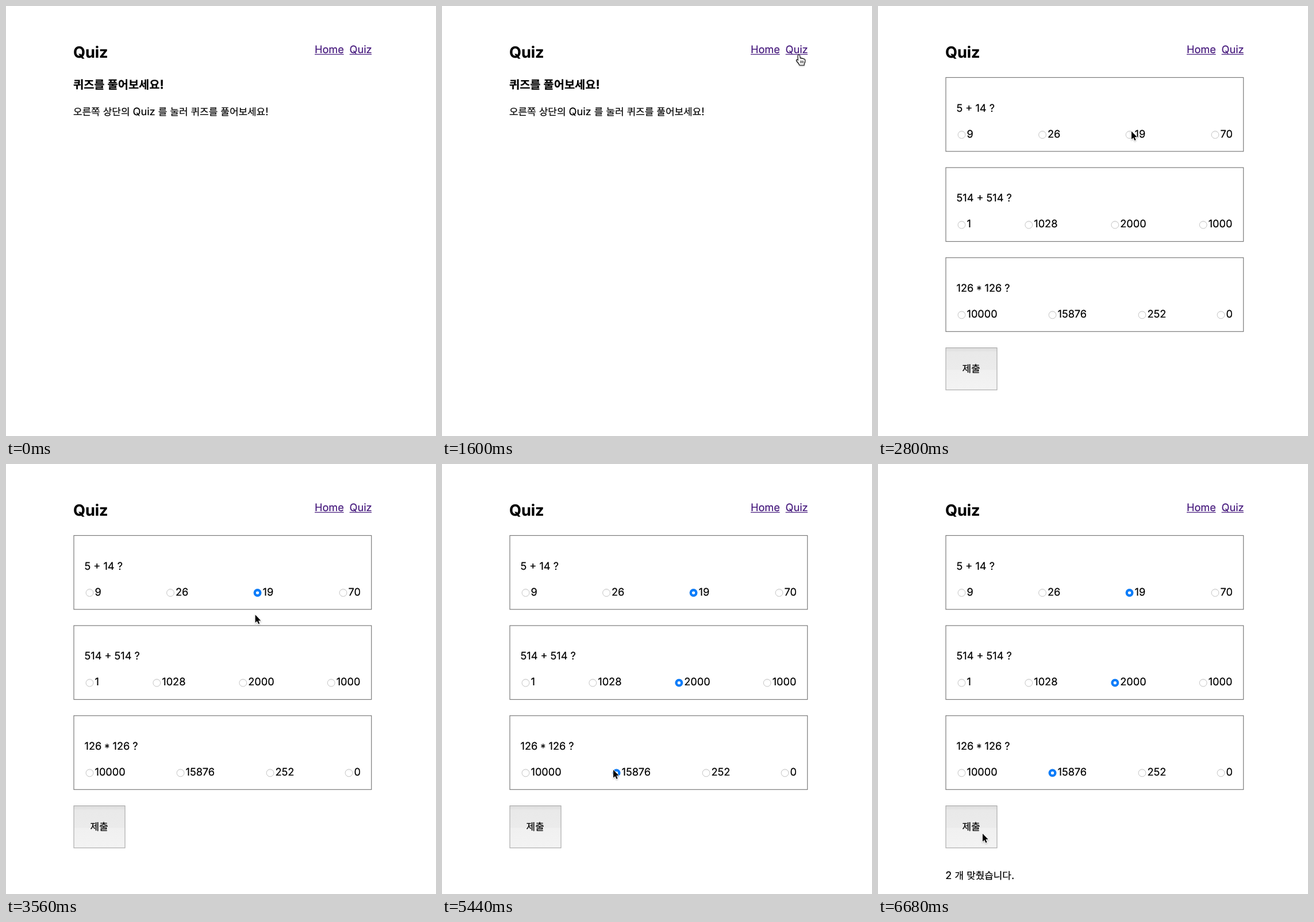
An HTML page for the animation above (6920 ms loop, 748 by 748 pixels).

```html
<!DOCTYPE html>
<html lang="ko">
<head>
<meta charset="utf-8">
<title>Quiz</title>
<style>
  html, body { margin: 0; width: 100%; height: 100%; overflow: hidden; background: #fff; }
  svg { display: block; width: 748px; height: 748px; }
  text { font: 18.15px Inter, "Noto Sans CJK KR", "Noto Sans CJK", sans-serif; fill: #000;
    stroke: #000; stroke-width: .2; white-space: pre; text-rendering: geometricPrecision; }
  .ko { font-family: "Noto Sans CJK KR", "Noto Sans CJK", sans-serif; font-size: .932em; }
  .h2 { font-size: 27px; font-weight: 700; }
  .h3 { font-size: 21.2px; font-weight: 700; }
  .link { fill: #45187c; stroke: #45187c; }
  .rule { stroke: #45187c; stroke-width: 1.3; }
  .card { fill: none; stroke: #767676; stroke-width: 1.15; }
  .star { font-feature-settings: "calt" 0; }
  .off { fill: url(#dial); stroke: #bdbdbd; stroke-width: .9; }
  .on { fill: #0d7dfa; }
  .dot { fill: #fff; }
</style>
</head>
<body>
<svg viewBox="0 0 748 748">
  <defs>
    <linearGradient id="dial" x2="0" y2="1">
      <stop offset="0" stop-color="#f3f3f3"/><stop offset=".35" stop-color="#fff"/>
    </linearGradient>
    <linearGradient id="face" x2="0" y2="1">
      <stop offset="0" stop-color="#dfdfdf"/><stop offset=".09" stop-color="#e4e4e4"/>
      <stop offset=".09" stop-color="#e9e9e9"/><stop offset=".52" stop-color="#ebebeb"/>
      <stop offset=".53" stop-color="#f0f0f0"/><stop offset="1" stop-color="#f3f3f3"/>
    </linearGradient>
    <filter id="shade" x="-50%" y="-50%" width="200%" height="200%">
      <feDropShadow dx="0" dy="1.2" stdDeviation="1.1" flood-opacity=".3"/>
    </filter>
  </defs>
  <g id="head"></g>
  <g id="home"></g>
  <g id="quiz"></g>
  <g id="result"></g>
  <g id="cursor" filter="url(#shade)">
    <path id="arrow" d="M0 0V13.8L3.2 10.9L5.5 16L7.6 15.1L5.4 10.1H9.7Z"
      stroke="#fff" stroke-width="1.6" paint-order="stroke"/>
    <g id="hand" fill="#fff" stroke="#000" stroke-width="1.1" stroke-linejoin="round">
      <path d="M-1.8 9.5L-2 1.2Q-1.6-.4-.2-.3Q1.2-.2 1.5 1.5L2.2 6Q3.6 4.6 5 6.4Q6.8 5.5 8 7.2Q10 6.8 10.6 8.6Q11 13 9.2 15L9 18H1Q-.5 14.5-4 11Q-5.2 9-4 8.3Q-2.8 8-1.8 9.5Z"/>
      <path d="M2.8 10V14.5M5 10V14.5M7.2 10V14.5" stroke-width=".9"/>
    </g>
  </g>
</svg>
<script>
const LOOP = 6920, STEP = 40;
const $ = id => document.getElementById(id);

// Hangul runs get their own size; the asterisk is lowered to the digits' middle
const mark = s => s
  .replace(/[\uac00-\ud7a3]+/g, '<tspan class="ko">$&</tspan>')
  .replace('* ', '<tspan class="star" dy="2.9">*</tspan><tspan dy="-2.9"> </tspan>');
const text = (x, y, s, cls = '') => `<text x="${x}" y="${y}" class="${cls}">${mark(s)}</text>`;
const link = (x, end, s) => text(x, 81.8, s, 'link') +
  `<path class="rule" d="M${x} 84.1H${end}"/>`;

const radio = (x, y, id) =>
  `<circle class="off" cx="${x}" cy="${y}" r="6.4"/>` +
  (id ? `<g id="${id}"><circle class="on" cx="${x}" cy="${y}" r="6.9"/>` +
        `<circle class="dot" cx="${x}" cy="${y}" r="2.6"/></g>` : '');

// question, [radio x, label], chosen option
const cards = [
  ['5 + 14 ?', [[145.5, '9'], [286, '26'], [437.5, '19'], [586.5, '70']], 2],
  ['514 + 514 ?', [[145.5, '1'], [262.3, '1028'], [412.3, '2000'], [565.7, '1000']], 2],
  ['126 * 126 ?', [[145.5, '10000'], [303.5, '15876'], [459.5, '252'], [596.5, '0']], 1]
];

const card = ([question, options, pick], i) => {
  const y = 124.4 + i * 156.7;
  return `<rect class="card" x="118" y="${y}" width="517.7" height="128.5"/>` +
    text(136.5, y + 59.2, question) +
    options.map(([x, label], k) =>
      radio(x, y + 99.6, k === pick && 'pick' + i) + text(x + 9, y + 104.3, label)).join('');
};

$('head').innerHTML = text(117, 89.7, 'Quiz', 'h2') + link(537, 587.6, 'Home') + link(597.6, 636, 'Quiz');
$('home').innerHTML = text(117, 144, '퀴즈를 풀어보세요!', 'h3') +
  text(117, 189.5, '오른쪽 상단의 Quiz 를 눌러 퀴즈를 풀어보세요!');
$('quiz').innerHTML = cards.map(card).join('') +
  '<rect x="118" y="594.6" width="89" height="73.2" fill="url(#face)" stroke="#a6a6a6" stroke-width="1.1"/>' +
  text(146.6, 637, '제출');
$('result').innerHTML = text(117.3, 722, '2 개 맞췄습니다.');

// pointer path: time, x, y
const path = [
  [440, 520, 690], [720, 590, 370], [1000, 624, 131], [1160, 621, 85], [2200, 621, 85],
  [2560, 546, 130], [2760, 441, 218], [3320, 441, 218], [4000, 415, 373], [4400, 415, 373],
  [4760, 334, 517], [5000, 298, 532], [5440, 298, 532], [5880, 200, 620],
  [6080, 182, 643], [LOOP, 182, 643]
];

const slope = (i, k) => {
  const a = path[i - 1], p = path[i], b = path[i + 1];
  if (!a) return (b[k] - p[k]) / (b[0] - p[0]);
  if (!b || a[k] === p[k] || b[k] === p[k]) return 0;
  return (b[k] - a[k]) / (b[0] - a[0]);
};

const along = (t, k) => {
  const i = Math.max(0, path.findLastIndex(p => p[0] <= t));
  const p = path[i], q = path[i + 1];
  if (!q || p[k] === q[k]) return p[k];
  const d = q[0] - p[0], u = (t - p[0]) / d, v = 1 - u;
  return p[k] * (1 + 2 * u) * v * v + slope(i, k) * d * u * v * v +
    q[k] * u * u * (3 - 2 * u) - slope(i + 1, k) * d * u * u * v;
};

const show = (id, on) => $(id).style.display = on ? '' : 'none';

function draw() {
  const t = Math.floor(performance.now() % LOOP / STEP) * STEP;
  const x = along(t, 1), y = along(t, 2);
  const over = y < 88 && x > 597;
  show('home', t < 1880);
  show('quiz', t >= 1880);
  [3000, 4160, 5240].forEach((at, i) => show('pick' + i, t >= at));
  show('result', t >= 6320);
  show('cursor', t >= 440);
  show('arrow', !over);
  show('hand', over);
  $('cursor').setAttribute('transform', `translate(${x.toFixed(1)} ${y.toFixed(1)})`);
  requestAnimationFrame(draw);
}
draw();
</script>
</body>
</html>
```
